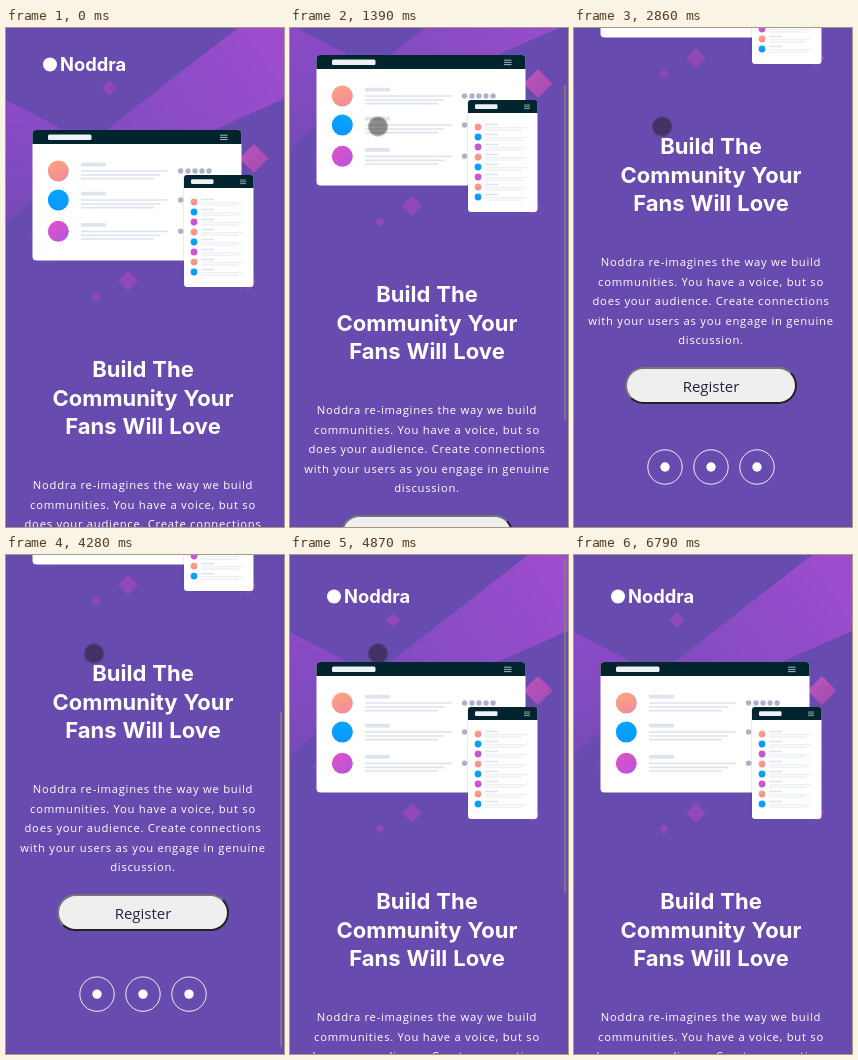
Animation, 278 px wide and 499 px high, one loop 6920 ms. Source, as an HTML page:

```html
<!DOCTYPE html>
<html lang="en">
<head>
<meta charset="utf-8">
<title>Landing page scroll</title>
<style>
  @property --scroll { syntax: "<number>"; inherits: true; initial-value: 5; }

  html, body { margin: 0; width: 100%; height: 100%; overflow: hidden; background: #674baf; }
  .stage {
    position: relative; width: 278px; height: 499px; overflow: hidden; background: #674baf;
    animation: scroll 6920ms infinite ease-in-out;
  }
  .page {
    position: absolute; left: 0; top: 0; width: 278px; height: 727px;
    transform: translateY(calc(var(--scroll) * -1px));
  }
  .page svg { display: block; }
  .thumb {
    position: absolute; left: 274px; top: 3px; width: 2px; height: 335px;
    border-radius: 1px; background: #837d88; opacity: 0;
    transform: translateY(calc(var(--scroll) * .675px));
    animation: thumb 6920ms infinite step-end;
  }
  .cursor {
    position: absolute; left: -10px; top: -10px; width: 20px; height: 20px; box-sizing: border-box;
    border-radius: 50%; border: 1px solid rgba(28, 28, 28, .4);
    background: rgba(28, 28, 28, .5) padding-box;
    animation: cursor 6920ms infinite ease-in-out;
  }
  .button {
    position: absolute; left: 51px; top: 567px; width: 172px; height: 37px; box-sizing: border-box;
    border: 2px solid; border-color: #767676 #212121 #212121 #767676; border-radius: 19px;
    background: #efefef; color: #25203f;
    font: 15px/34px "Open Sans", sans-serif; text-align: center;
  }
  text { fill: #fff; }
  .copy { text-anchor: middle; font: 500 11.25px "Open Sans", sans-serif; letter-spacing: .72px; }
  .title { text-anchor: middle; font: 700 22px Inter, sans-serif; word-spacing: .8px; }
  .brand { font: 700 18.3px Inter, sans-serif; }

  @keyframes scroll {
    0%, 16.618% { --scroll: 5; }
    20.087%, 23.266% { --scroll: 80; }
    26.734%, 30.202% { --scroll: 155; }
    33.671%, 61.777% { --scroll: 228; }
    64.74% { --scroll: 154; }
    67.746% { --scroll: 80; }
    70.376%, 100% { --scroll: 0; }
  }
  @keyframes thumb {
    0% { opacity: 0; }
    16.908% { opacity: .85; }
    38.006% { opacity: .45; }
    41.329% { opacity: 0; }
    61.85% { opacity: .85; }
    75.434% { opacity: .45; }
    77.746% { opacity: .12; }
    80.347%, 100% { opacity: 0; }
  }
  @keyframes cursor {
    0% { transform: translate(241px, 520px); animation-timing-function: step-end; }
    .289% { transform: translate(241px, 506px); }
    5.491% { transform: translate(79px, 112px); }
    7.948%, 80.202% { transform: translate(88px, 98.5px); }
    90.173%, 90.462% { transform: translate(267px, 474px); }
    94.798% { transform: translate(268px, 508px); animation-timing-function: step-end; }
    98.121%, 100% { transform: translate(268px, 520px); }
  }
</style>
</head>
<body>
<div class="stage">
  <div class="page">
    <svg width="278" height="727" viewBox="0 0 278 727">
      <defs>
        <linearGradient id="beamRight" gradientUnits="userSpaceOnUse" x1="278" y1="0" x2="90" y2="130">
          <stop stop-color="#9f4dcf"/><stop offset="1" stop-color="#7e4bbf"/>
        </linearGradient>
        <linearGradient id="beamLeft" gradientUnits="userSpaceOnUse" x1="0" y1="77" x2="18" y2="200">
          <stop stop-color="#8d4ac8"/><stop offset="1" stop-color="#754bb7"/>
        </linearGradient>
        <linearGradient id="gem" x1="0" y1="0" x2="1" y2="1">
          <stop stop-color="#c055b6"/><stop offset="1" stop-color="#a04ab4"/>
        </linearGradient>
        <linearGradient id="coral" x1="0" y1="0" x2=".4" y2="1">
          <stop stop-color="#ffa67c"/><stop offset="1" stop-color="#f38d97"/>
        </linearGradient>
        <linearGradient id="blue" x1="0" y1="0" x2="0" y2="1">
          <stop stop-color="#05a6ff"/><stop offset="1" stop-color="#0a97fb"/>
        </linearGradient>
        <linearGradient id="pink" x1="0" y1="0" x2="1" y2="1">
          <stop stop-color="#e552c3"/><stop offset="1" stop-color="#b355e0"/>
        </linearGradient>

        <g id="row">
          <circle cx="52.300" r="10.500"/>
          <rect x="75" y="-8.200" width="25" height="3.600" rx="1" fill="#dfe4ec"/>
          <path d="M75 0H162M75 4H154.500M75 7.700H148" stroke="#dde4ee" stroke-width="1.700"/>
          <circle cx="174.600" r="2.700" fill="#aeb2c8"/>
        </g>
        <g id="item">
          <circle cx="188" r="3.400"/>
          <path d="M195 -2.500H208" stroke="#e0e5ed" stroke-width="1.600"/>
          <path d="M195 .7H237M195 3H232" stroke="#e6eaf1" stroke-width="1.100"/>
        </g>
      </defs>

      <!-- backdrop -->
      <path d="M238 0H278V76L205 108L100 112V107Z" fill="url(#beamRight)"/>
      <path d="M0 77L60 108L28 176L0 201Z" fill="url(#beamLeft)"/>
      <g fill="#9149b8">
        <path d="M103 57.500l7.500 7.500l-7.500 7.500l-7.500 -7.500z"/>
        <path d="M122 248l10 10l-10 10l-10 -10z"/>
        <path d="M90 269l5 5l-5 5l-5 -5z"/>
        <path d="M242 249l9 9l-9 9l-9 -9z"/>
        <path d="M27 207l5 5l-5 5l-5 -5z" opacity=".5"/>
      </g>
      <path d="M248 121l14.500 14.500l-14.500 14.500l-14.500 -14.500z" fill="url(#gem)"/>

      <circle cx="44" cy="41.500" r="7" fill="#fff"/>
      <text class="brand" x="54" y="47.500">Noddra</text>

      <!-- wide window -->
      <rect x="26.500" y="107" width="209" height="130.500" rx="4" fill="#fff"/>
      <path d="M26.500 121V111a4 4 0 0 1 4 -4H231.500a4 4 0 0 1 4 4V121z" fill="#00252e"/>
      <rect x="42" y="111.500" width="43.500" height="5.500" rx="1.500" fill="#eef1f6"/>
      <path d="M214 112.200H221.500M214 114.400H221.500M214 116.600H221.500" stroke="#a9b7bb" stroke-width="1"/>
      <use href="#row" y="148" fill="url(#coral)"/>
      <use href="#row" y="177" fill="url(#blue)"/>
      <use href="#row" y="208.300" fill="url(#pink)"/>
      <path d="M182 148h.01m7 0h.01m7 0h.01m7 0h.01" stroke="#aeb2c8" stroke-width="5.400" stroke-linecap="round"/>

      <!-- narrow window -->
      <rect x="177.500" y="152" width="70.500" height="112.300" rx="3.500" fill="#352a66" opacity=".2"/>
      <rect x="178" y="152" width="69.500" height="112" rx="3" fill="#fff"/>
      <path d="M178 165V155a3 3 0 0 1 3 -3H244.500a3 3 0 0 1 3 3V165z" fill="#00252e"/>
      <rect x="185" y="156.300" width="22.500" height="4.600" rx="1.200" fill="#eef1f6"/>
      <path d="M234 157H240M234 158.800H240M234 160.600H240" stroke="#a9b7bb" stroke-width=".8"/>
      <use href="#item" y="179" fill="url(#coral)"/>
      <use href="#item" y="189" fill="url(#blue)"/>
      <use href="#item" y="199" fill="url(#pink)"/>
      <use href="#item" y="209" fill="url(#coral)"/>
      <use href="#item" y="219" fill="url(#blue)"/>
      <use href="#item" y="229" fill="url(#pink)"/>
      <use href="#item" y="239" fill="url(#coral)"/>
      <use href="#item" y="249" fill="url(#blue)"/>

      <g class="title">
        <text x="137" y="354.300">Build The</text>
        <text x="137" y="383">Community Your</text>
        <text x="137" y="411.300">Fans Will Love</text>
      </g>
      <g class="copy">
        <text x="137" y="466">Noddra re-imagines the way we build</text>
        <text x="137" y="485.500">communities. You have a voice, but so</text>
        <text x="137" y="505">does your audience. Create connections</text>
        <text x="137" y="524.500">with your users as you engage in genuine</text>
        <text x="137" y="544">discussion.</text>
      </g>

      <g fill="none" stroke="#fff" stroke-opacity=".9">
        <circle cx="91" cy="667" r="17.200"/>
        <circle cx="137" cy="667" r="17.200"/>
        <circle cx="183" cy="667" r="17.200"/>
      </g>
      <g fill="#fff">
        <circle cx="91" cy="667" r="4.700"/>
        <circle cx="137" cy="667" r="4.700"/>
        <circle cx="183" cy="667" r="4.700"/>
      </g>
    </svg>
    <div class="button">Register</div>
  </div>
  <div class="thumb"></div>
  <div class="cursor"></div>
</div>
</body>
</html>
```
